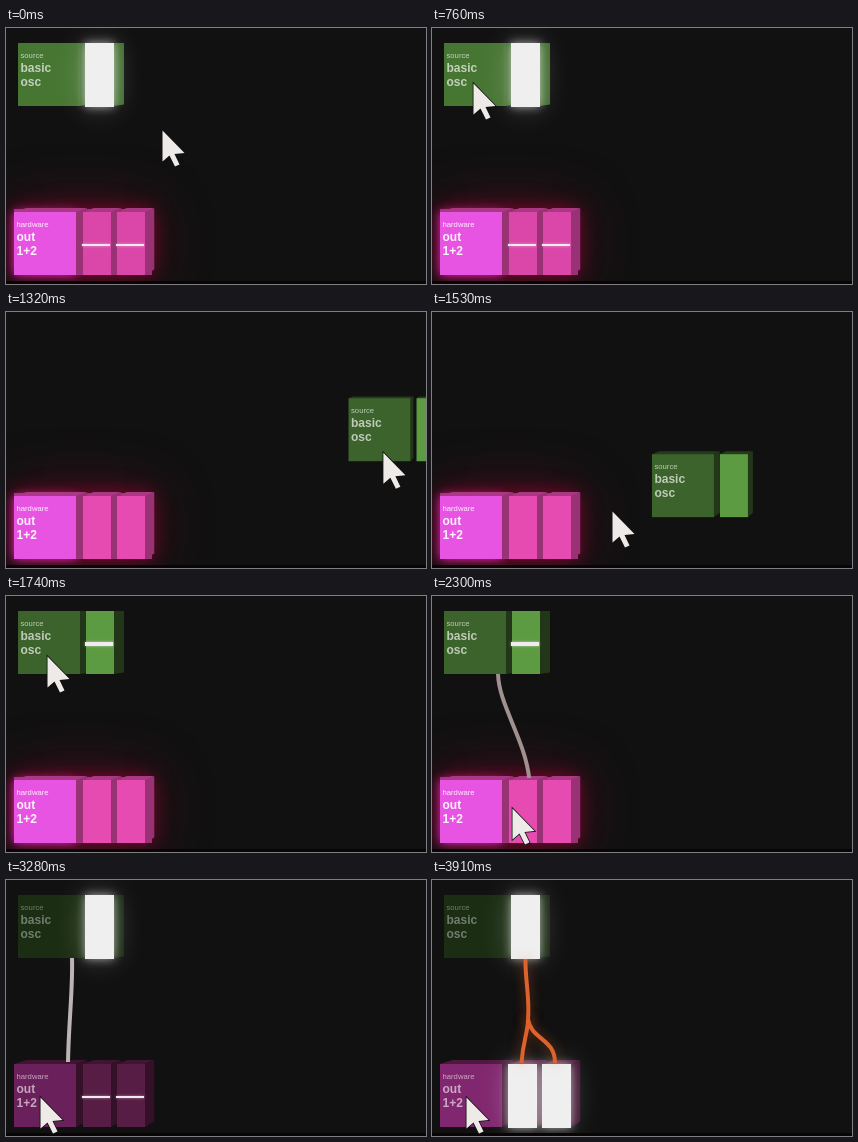
An HTML page with a canvas for the animation above (3980 ms loop, 420 by 256 pixels).

```html
<!DOCTYPE html>
<html lang="en">
<head>
<meta charset="utf-8">
<title>Patching blocks</title>
<style>
html, body { margin: 0; width: 100%; height: 100%; overflow: hidden; background: #111; }
canvas { display: block; width: 420px; height: 256px; }
</style>
</head>
<body>
<canvas id="stage" width="420" height="256"></canvas>
<script>
const ctx = document.getElementById('stage').getContext('2d');
const LOOP = 3980, FIRST = 130, STEP = 70;
const GRAB = 770, DARK = 830, DROP = 1740, PLAY = 2930, ROUTE = 3490;
const LAG = 70;                          // the dragged block trails the pointer
const VANISH = { x: 525, y: 17 }, DEPTH = 0.024;
const MAIN = 62, PAD = 28, TALL = 63;
const FONT = '"Liberation Sans", Arial, sans-serif';
const GREEN = [93, 155, 67], MAGENTA = [232, 84, 226], PINK = [230, 75, 178], PLUM = [230, 70, 198];

const shade = (rgb, k) => `rgb(${rgb.map(c => Math.round(c * k))})`;
const clamp = (v, low, high) => Math.min(high, Math.max(low, v));

// Pointer keys: [ms, x, y]
const dragPath = [
  [60, 156, 102], [620, 41, 55], [GRAB, 41, 55],
  [1300, 380, 136], [1530, 180, 199], [DROP, 60, 210]
];
const patchPath = [[DROP, 41, 60], [2050, 114, 135], [2300, 80, 212], [2400, 100, 216], [2620, 34, 217]];

// Hermite interpolation, flat at holds and turning points
function slope(keys, i, axis) {
  const a = keys[i - 1], b = keys[i], c = keys[i + 1];
  if (!a || !c || (b[axis] - a[axis]) * (c[axis] - b[axis]) <= 0) return 0;
  return (c[axis] - a[axis]) / (c[0] - a[0]);
}

function follow(keys, t) {
  let i = 0;
  while (i < keys.length - 2 && t >= keys[i + 1][0]) i++;
  const a = keys[i], b = keys[i + 1], span = b[0] - a[0];
  const u = clamp((t - a[0]) / span, 0, 1), ease = u * u * (3 - 2 * u);
  const at = axis => a[axis] + (b[axis] - a[axis]) * ease
    + span * u * (1 - u) * ((1 - u) * slope(keys, i, axis) - u * slope(keys, i + 1, axis));
  return { x: at(1), y: at(2) };
}

function trace(points) {
  ctx.beginPath();
  points.forEach(p => ctx.lineTo(...p));
  ctx.closePath();
}

function shape(points, fill) {
  trace(points);
  ctx.fillStyle = fill;
  ctx.fill();
}

function glow(color, blur, draw) {
  ctx.save();
  ctx.shadowColor = color;
  ctx.shadowBlur = blur;
  draw();
  ctx.restore();
}

function rect(x, y, w, h, fill) {
  ctx.fillStyle = fill;
  ctx.fillRect(x, y, w, h);
}

const recede = (x, y) => [x + (VANISH.x - x) * DEPTH, y + (VANISH.y - y) * DEPTH];

function extrude(x, y, w, look) {
  const r = x + w, b = y + TALL;
  shape([[x, y], recede(x, y), recede(r, y), [r, y]], look.top);
  shape([[r, y], recede(r, y), recede(r, b), [r, b]], look.side);
}

function pad(x, y, look) {
  if (look.full) {
    const white = () => rect(x - 1, y, PAD + 1, TALL + 1, '#efefef');
    glow('rgba(255,255,255,.25)', 30, white);
    glow('rgba(255,255,255,.6)', 10, white);
    return;
  }
  rect(x, y, PAD, TALL, look.pad);
  if (look.line) {
    glow('rgba(255,255,255,.5)', 3, () => rect(x - 1, y + 33 - look.line / 2, PAD, look.line, '#f3e9f0'));
  }
}

function label(lines, x, y, color) {
  ctx.fillStyle = color;
  lines.forEach((text, i) => {
    ctx.font = i ? `bold 12px ${FONT}` : `7.7px ${FONT}`;
    ctx.fillText(text, x, y + 15 + 14 * i);
  });
}

function block(x, y, pads, lines, look) {
  const right = x + pads[pads.length - 1] + PAD;
  if (look.halo) {
    const body = () => rect(x, y - 3, right - x + 7, TALL + 3, look.side);
    glow('rgba(150,0,50,.4)', 60, body);
    glow('rgba(190,0,60,.6)', 18, body);
    glow('rgba(255,50,220,.8)', 9, () => rect(x, y, MAIN, TALL, look.front));
  }
  [...pads].reverse().forEach(dx => extrude(x + dx, y, PAD, look));
  extrude(x, y, MAIN, look);
  rect(x, y, MAIN, TALL, look.front);
  pads.forEach(dx => pad(x + dx, y, look));
  label(lines, x + 2.5, y, look.text);
}

function sourceLook(t) {
  const lit = t < DARK, playing = t >= PLAY;
  const level = lit ? 0.76 : playing ? 0.29 : 0.64;
  return {
    front: shade(GREEN, level),
    side: shade(GREEN, level * (lit || playing ? 0.92 : 0.55)),
    top: shade(GREEN, level * 0.6),
    pad: shade(GREEN, 1),
    text: `rgba(255,255,255,${playing ? 0.38 : 0.67})`,
    full: lit || playing,
    line: t >= DROP ? 4 : 0
  };
}

function outputLook(t) {
  const lit = t < DARK, playing = t >= PLAY, routed = t >= ROUTE;
  const level = routed ? 0.56 : playing ? 0.46 : 1;
  return {
    front: shade(playing ? PLUM : MAGENTA, level),
    side: shade(PINK, playing ? level * 0.5 : 0.66),
    top: shade(PINK, playing ? level * 0.6 : 0.74),
    pad: shade(PINK, playing ? 0.38 : lit ? 0.95 : 1),
    text: `rgba(255,255,255,${playing ? 0.6 : 0.92})`,
    halo: !playing,
    full: routed,
    line: lit || playing ? 2 : 0
  };
}

function cable(color, width, x, y, ...bends) {
  ctx.strokeStyle = color;
  ctx.lineWidth = width;
  ctx.beginPath();
  ctx.moveTo(x, y);
  ctx.bezierCurveTo(...bends);
  ctx.stroke();
}

function drawCables(t, hand) {
  if (t >= ROUTE) {
    const orange = '#dc632d', fork = [96, 139];
    glow('rgba(230,90,30,.5)', 12, () => {
      cable(orange, 4, 93.5, 79, 93, 100, 98, 118, ...fork);
      cable(orange, 4, ...fork, 96, 153, 91, 160, 89.5, 183);
      cable(orange, 4, ...fork, 99, 160, 123, 158, 123, 183);
    });
    return;
  }
  // The loose end swings beside the hand until it rests on the output block
  const x = 36 + hand.x * 0.765, y = clamp(hand.y - 25, 78, 182), drop = y - 78;
  if (drop > 0) {
    cable(t < PLAY ? '#a0908f' : '#bcb4b4', 4,
      66, 78, 67, 78 + drop * 0.3, x + (66 - x) * 0.15, 78 + drop * 0.62, x, y);
  }
}

function pointer({ x, y }) {
  ctx.save();
  ctx.translate(x + 0.5, y + 0.5);
  trace([[0, 0], [0, 31], [7, 25], [12.5, 36], [17, 34], [12, 23.5], [22, 22.5]]);
  ctx.strokeStyle = '#111';
  ctx.lineWidth = 1.6;
  ctx.stroke();
  ctx.fillStyle = '#eeeae8';
  ctx.fill();
  ctx.restore();
}

function render(t) {
  const hand = follow(t < DROP ? dragPath : patchPath, t);
  let spot = { x: 12, y: 15 };
  if (t >= GRAB && t < DROP) {
    const held = follow(dragPath, t - LAG);
    spot = { x: held.x - 29, y: held.y - 40 };
  }
  rect(0, 0, 420, 256, '#111');
  block(8, 184, [69, 103], ['hardware', 'out', '1+2'], outputLook(t));
  rect(0, 253, 420, 3, '#090506');
  block(spot.x, spot.y, [68], ['source', 'basic', 'osc'], sourceLook(t));
  if (t >= DROP) drawCables(t, hand);
  pointer(hand);
}

const start = performance.now();
function tick() {
  const t = (performance.now() - start) % LOOP;
  render(t < FIRST ? 0 : FIRST + Math.floor((t - FIRST) / STEP) * STEP);
  requestAnimationFrame(tick);
}
tick();
</script>
</body>
</html>
```
